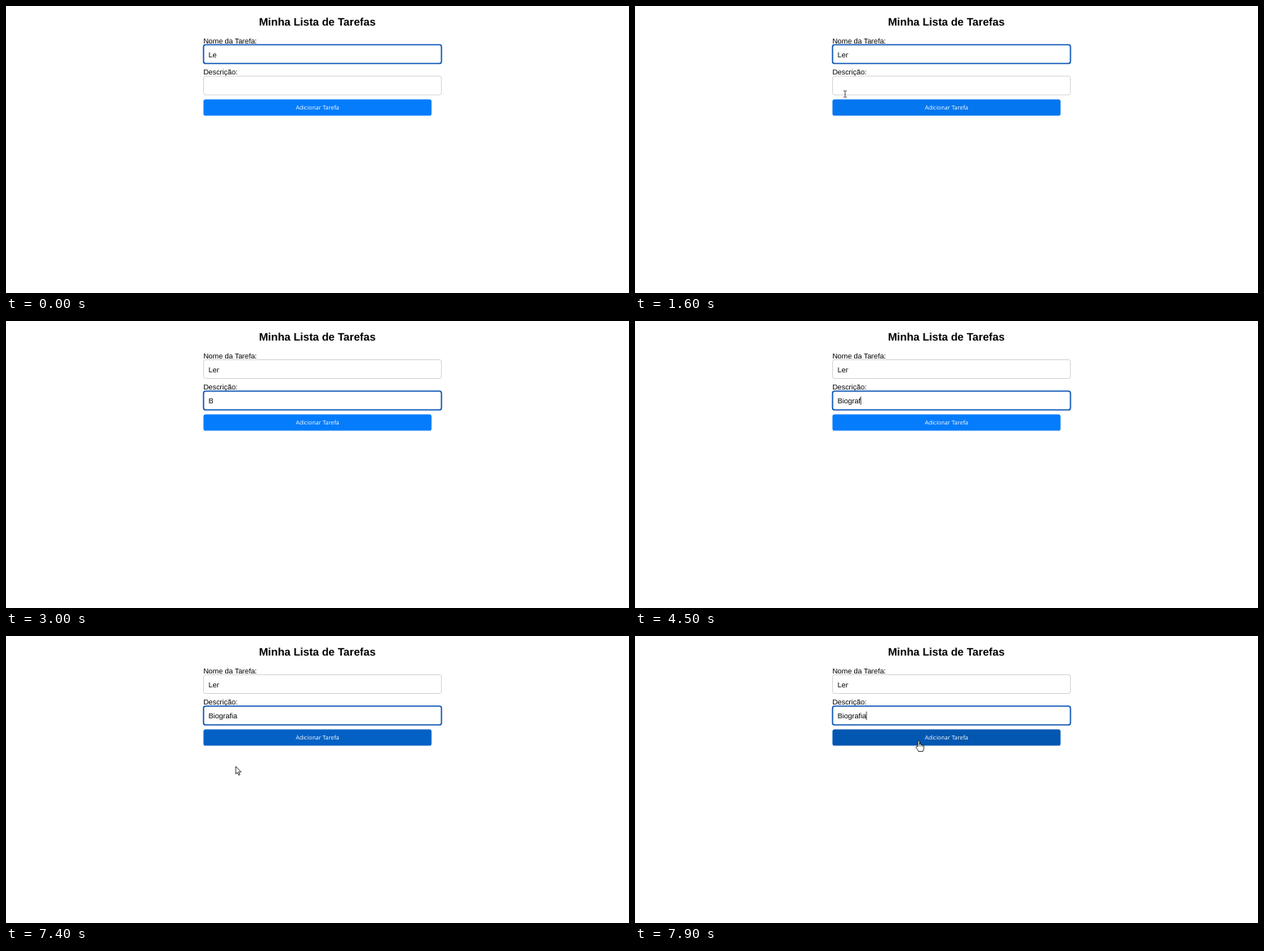
Animation of 762x352 px, one loop 8000 ms. Source, as an HTML page:

```html
<!DOCTYPE html>
<html lang="pt">
<head>
<meta charset="utf-8">
<title>Minha Lista de Tarefas</title>
<style>
  html, body { margin: 0; width: 100%; height: 100%; overflow: hidden; background: #fff; }
  svg { display: block; width: 100vw; height: 100vh; }
  text { font: 8.89px "Liberation Sans", Arial, sans-serif; text-rendering: geometricPrecision; }
  .title { font-size: 13.33px; font-weight: bold; text-anchor: middle; }
  .caption { font: 7.03px "Open Sans", "Noto Sans", sans-serif; fill: #fff; text-anchor: middle; }
  .box { fill: #fff; stroke: #ccc; stroke-width: .8; }
  .focused .box { stroke: #0f58b8; stroke-width: 1.6; }
  .caret { stroke: #000; stroke-width: .7; }
  .outlined { fill: #fff; stroke: #000; stroke-width: .75; stroke-linejoin: round; }
</style>
</head>
<body>
<svg viewBox="0 0 762 352">
  <text class="title" x="380.8" y="23.5">Minha Lista de Tarefas</text>
  <text x="241.4" y="45.9">Nome da Tarefa:</text>
  <text x="241.4" y="84.4">Descrição:</text>

  <g id="name">
    <rect class="box" x="241.6" y="47.5" width="291" height="23" rx="2.6"/>
    <text class="value" x="247.8" y="62.6"></text>
    <path class="caret" d="M0 54V64.5"/>
  </g>
  <g id="description">
    <rect class="box" x="241.6" y="86" width="291" height="23" rx="2.6"/>
    <text class="value" x="247.8" y="101.1"></text>
    <path class="caret" d="M0 92.6V103"/>
  </g>

  <rect id="button" x="241.5" y="114.4" width="279" height="20.2" rx="2.6"/>
  <text class="caption" x="381" y="127.3">Adicionar Tarefa</text>

  <g id="pointer">
    <path id="arrow" class="outlined" d="M0 0V9.2L2.1 7.3 3.6 10.7 5.1 10 3.6 6.8H6.5Z"/>
    <g id="hand">
      <path class="outlined" d="M-1 6.5V.6Q-1-.4 0-.4T1 .6V4Q2-.2 3 4.6 4.4 3.8 4.7 5.2 6.2 4.6 6.2 6V8.6Q6.2 10.2 5.1 12.6H-.3Q-.8 10.6-2.9 8.3-3.8 6.7-2.5 6.4Z"/>
      <path d="M1 4V6.4M3 4.6V6.6M4.7 5.2V6.8" fill="none" stroke="#000" stroke-width=".6"/>
    </g>
    <path id="beam" d="M-2-4H-.5L0-3.5.5-4H2M0-3.5V3.5M-2 4H-.5L0 3.5.5 4H2" fill="none" stroke="#222" stroke-width=".8"/>
  </g>
</svg>
<script>
const LOOP = 8000, STEP = 100;
const byId = id => document.getElementById(id);

const nameTyping = [[0, "Le"], [300, "Ler"]];
const descriptionTyping = [
  [0, ""], [2700, "B"], [3200, "Bi"], [3300, "Bio"], [3700, "Biog"], [4000, "Biogr"],
  [4300, "Biogra"], [4500, "Biograf"], [5000, "Biografi"], [5100, "Biografii"],
  [6100, "Biografi"], [6600, "Biografia"]
];
const focusChanges = [[0, "name"], [2100, "description"]];
const caretChanges = [
  [0, false], [300, true], [600, false], [1100, true], [1600, false], [2100, true],
  [3000, false], [3200, true], [4800, false], [5000, true], [5300, false],
  [6000, true], [6400, false], [6600, true], [6900, false], [7500, true]
];
const pointerShapes = [
  [0, ""], [1100, "hand"], [1600, "beam"], [2700, ""],
  [7200, "hand"], [7300, "arrow"], [7800, "hand"]
];
const pointerPath = [
  [1100, 258, 122], [1300, 256.5, 119], [1600, 257, 108], [1900, 257, 101],
  [7200, 264, 120], [7300, 274, 143], [7400, 281, 160], [7500, 296, 158],
  [7700, 334, 138], [7800, 343, 131], [7900, 347, 129]
];
const hoverAmount = [
  [1200, 0], [1300, .21], [1400, .5], [1700, 0], [7100, 0], [7200, .45],
  [7300, .9], [7400, .73], [7500, .4], [7600, .35], [7800, 1]
];

const current = (changes, t) => changes.findLast(([start]) => start <= t)[1];

function interpolate(points, t, axis = 1) {
  const next = points.findIndex(([time]) => time > t);
  if (next < 0) return points.at(-1)[axis];
  if (next === 0) return points[0][axis];
  const a = points[next - 1], b = points[next];
  return a[axis] + (b[axis] - a[axis]) * (t - a[0]) / (b[0] - a[0]);
}

function drawField(id, typing, t) {
  const field = byId(id);
  const value = field.querySelector(".value");
  const caret = field.querySelector(".caret");
  const focused = current(focusChanges, t) === id;
  const text = current(typing, t);
  field.classList.toggle("focused", focused);
  value.textContent = text;
  const width = text ? value.getComputedTextLength() : 0;
  caret.setAttribute("transform", `translate(${248 + width} 0)`);
  caret.style.display = focused && current(caretChanges, t) ? "" : "none";
}

function drawPointer(t) {
  const shape = current(pointerShapes, t);
  for (const id of ["arrow", "hand", "beam"]) byId(id).style.display = id === shape ? "" : "none";
  const x = interpolate(pointerPath, t, 1), y = interpolate(pointerPath, t, 2);
  byId("pointer").setAttribute("transform", `translate(${x} ${y})`);
}

function drawButton(t) {
  const amount = interpolate(hoverAmount, t);
  const mix = (from, to) => Math.round(from + (to - from) * amount);
  byId("button").style.fill = `rgb(${mix(4, 2)}, ${mix(124, 87)}, ${mix(252, 177)})`;
}

function draw() {
  const t = Math.floor(performance.now() % LOOP / STEP) * STEP;
  drawField("name", nameTyping, t);
  drawField("description", descriptionTyping, t);
  drawButton(t);
  drawPointer(t);
  requestAnimationFrame(draw);
}
draw();
</script>
</body>
</html>
```
